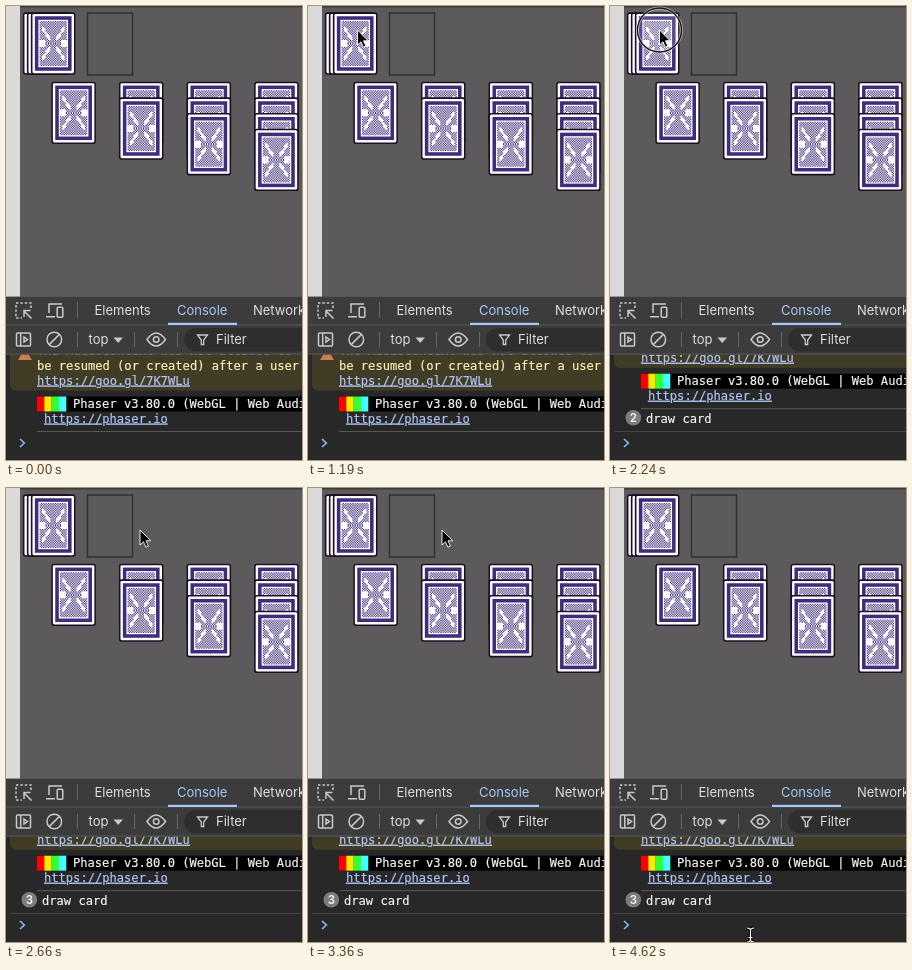
An HTML page that plays this animation: 296 px wide and 454 px high, repeating every 4.69 s.

```html
<!DOCTYPE html>
<html lang="en">
<head>
<meta charset="utf-8">
<title>Card table with console</title>
<style>
  html, body { margin: 0; width: 100%; height: 100%; overflow: hidden; background: #282828; }
  svg { display: block; width: 296px; height: 454px; }
  text { white-space: pre; }
  .ui { font: 13px Inter, "Liberation Sans", sans-serif; fill: #dedede; }
  .mono { font: 12.1px "DejaVu Sans Mono", "Liberation Mono", monospace; fill: #f4f4f4; stroke: #f4f4f4; stroke-width: .2; }
  .mono rect { stroke: none; }
  .mono .warn { fill: #fbf0b4; stroke: #fbf0b4; }
  .mono .link { fill: #b0c4f4; stroke: #b0c4f4; text-decoration: underline; }
  .icon { fill: none; stroke: #c9c9c9; stroke-width: 1.5; }
  .rule { fill: none; stroke: #56575a; }
</style>
</head>
<body>
<svg viewBox="0 0 296 454">
  <defs>
    <g id="card">
      <rect x="-.3" y="-.3" width="37.6" height="52.6" rx="2.2" fill="#1d0f26"/>
      <rect x="1" y="1" width="35" height="50" rx="1.2" fill="#fff"/>
      <rect x="3" y="3" width="31" height="46" fill="#3f2d7c"/>
      <rect x="6" y="6" width="25" height="40" fill="#fff"/>
      <path id="weave" fill="#3f2d7c"/>
    </g>
    <path id="beamShape" d="M-3.5 -7Q0 -7 0 -4.5Q0 -7 3.5 -7M0 -5V6M-3.5 7Q0 7 0 4.5Q0 7 3.5 7M-2 2.5H2"/>
    <clipPath id="consoleClip"><rect y="348" width="296" height="106"/></clipPath>
  </defs>

  <!-- game -->
  <rect width="296" height="291" fill="#5c5a5b"/>
  <rect x="14" width="282" height="1.5" fill="#3c3c3c"/>
  <rect x="81.5" y="7" width="45" height="62" fill="none" stroke="#303030" stroke-width="1.5"/>
  <g id="table"></g>

  <!-- console log -->
  <rect y="348" width="296" height="106" fill="#282828"/>
  <g clip-path="url(#consoleClip)">
    <g id="log">
      <rect x="4" y="330" width="300" height="54.5" rx="6" fill="#413c26"/>
      <path d="M12 354L19 342L26 354Z" fill="#c9804a"/>
      <g class="mono">
        <text class="warn" x="31" y="349">The AudioContext was not allowed to</text>
        <text class="warn" x="31" y="363.5">be resumed (or created) after a user</text>
        <text class="link" x="31" y="378.5">https://goo.gl/7K7WLu</text>
        <rect x="31" y="390.5" width="265" height="15" fill="#000"/>
        <g id="rainbow"></g>
        <text x="67" y="402.3">Phaser v3.80.0 (WebGL | Web Audio)</text>
        <text class="link" x="38" y="416.5">https://phaser.io</text>
      </g>
      <path class="rule" d="M31 425.5H296"/>
    </g>
    <g id="draw">
      <g id="badge">
        <circle cx="23.3" cy="411.7" r="7.8" fill="#7c7c7c"/>
        <text id="count" x="23.3" y="415.8" text-anchor="middle" style="font:600 11.5px Inter,sans-serif" fill="#f4f4f4"></text>
      </g>
      <text id="entry" class="mono" y="417">draw card</text>
      <path class="rule" d="M4 425.5H296" stroke-opacity=".6"/>
    </g>
    <path d="M14 433L18.3 437L14 441" fill="none" stroke="#8fb5fa" stroke-width="1.6"/>
  </g>

  <!-- toolbars -->
  <rect y="290" width="296" height="58.5" fill="#3c3c3c"/>
  <path d="M0 290.5H296M0 319H296M0 348H296" stroke="#555658"/>
  <rect width="14" height="290.5" fill="#dadada"/>
  <rect x="162" y="316.8" width="69" height="2.2" fill="#a8c7fa"/>
  <rect x="178" y="322" width="140" height="23.5" rx="11.7" fill="#2e2e2e"/>
  <path d="M71.5 296V312M71.5 326V341M128.5 326V341M171.5 326V341" stroke="#66676a"/>
  <g class="icon">
    <path d="M25 302V297H10V312H16" stroke-dasharray="2.4 2"/>
    <path d="M25.5 312.5L18 305M18 311V304.5H24.5"/>
    <path d="M43 307V298H56M40 310.8H49"/>
    <rect x="51.2" y="301.2" width="5.6" height="10" rx="1"/>
    <rect x="10.5" y="327" width="14" height="13" rx="1"/>
    <path d="M14.7 327V340M18 331L21.5 333.5L18 336Z"/>
    <circle cx="48.3" cy="333.5" r="7.3"/>
    <path d="M43.2 338.6L53.4 328.4"/>
    <path d="M141 333.5Q150 320.5 159.5 333.5Q150 346.5 141 333.5Z"/>
    <circle cx="150.2" cy="333.5" r="2.8"/>
    <path d="M191.5 329H201.5L197.7 334V338.5H195.3V334Z" stroke-width="1.3"/>
  </g>
  <path d="M107.5 331.5H117L112.2 337Z" fill="#c9c9c9"/>
  <g class="ui">
    <text x="88.5" y="308.5">Elements</text>
    <text x="171" y="308.5" style="fill:#a8c7fa">Console</text>
    <text x="247" y="308.5">Network</text>
    <text x="82.5" y="338">top</text>
    <text x="210" y="338">Filter</text>
  </g>

  <!-- pointer -->
  <g id="pointer">
    <g id="ring">
      <circle r="22" fill="#fff" fill-opacity=".14" stroke="#fff" stroke-opacity=".55" stroke-width="3"/>
      <circle r="22" fill="none" stroke="#151515" stroke-width="1.4"/>
    </g>
    <path id="arrow" d="M0 0V15L3.5 11.8L5.9 17.2L8.4 16.1L6 10.8H10.7Z" fill="#000" stroke="#fff" stroke-width=".9"/>
    <g id="beam" fill="none">
      <use href="#beamShape" stroke="#000" stroke-width="3"/>
      <use href="#beamShape" stroke="#fff" stroke-width="1.2"/>
    </g>
  </g>
</svg>
<script>
const $ = id => document.getElementById(id);
const make = (parent, tag, attrs) => {
  const el = document.createElementNS('http://www.w3.org/2000/svg', tag);
  for (const key in attrs) el.setAttribute(key, attrs[key]);
  parent.append(el);
};
const show = (el, on) => { el.style.display = on ? '' : 'none'; };

// Mirrored checker on the card back, with white petals along the diagonals
let weave = '';
for (let y = 7; y < 45; y++) {
  for (let x = 7; x < 30; x++) {
    const dx = Math.abs(x - 18), dy = Math.floor(Math.abs(y - 25.5));
    const petal = dx > 2 && dx < 10 && Math.abs(dy - 1.3 * dx) < 2;
    const side = Math.hypot(dx - 9, dy) < 2.6;
    const outline = Math.abs(dx - dy) === 6;
    const inked = !petal && !side && ((dx + dy) % 2 === 0 || outline && dx % 3 === 0);
    if (inked) weave += `M${x} ${y}h1v1h-1z`;
  }
}
$('weave').setAttribute('d', weave);

const addCard = (x, y) =>
  make($('table'), 'use', { href: '#card', transform: `translate(${x} ${y}) scale(1.185)` });
for (let i = 0; i < 3; i++) addCard(17.3 + i * 4, 6.7);
for (let col = 0; col < 4; col++) {
  for (let row = 0; row <= col; row++) addCard(45.7 + col * 67.6, 76 + row * 15.7);
}

['#f00', '#ffe800', '#3f3', '#4ff'].forEach((fill, i) =>
  make($('rainbow'), 'rect', { x: 31 + i * 7.3, y: 390.5, width: 7.4, height: 15, fill }));

const LOOP = 4690, STEP = 70;

// start, end, from, bend, to
const moves = [
  [0, 560, [296, 440], [150, 170], [49.5, 24]],
  [2380, 2660, [49.5, 24], [95, 24], [134, 42]],
  [3570, 3850, [134, 42], [136, 90], [133.5, 141]],
  [4130, 4620, [133.5, 141], [181, 300], [140.5, 447]]
];
const clicks = [
  [630, 700], [1120, 1190], [1750, 1820], [2240, 2310],
  [2730, 2870], [2940, 3080], [3150, 3290], [3430, 3500], [3850, 4130]
];
const logTimes = [1260, 1820, 2310];

const ease = p => p * p * (3 - 2 * p);

function place(t) {
  const [start, end, a, b, c] = moves.filter(m => t >= m[0]).pop();
  const p = ease(Math.min(1, (t - start) / (end - start))), q = 1 - p;
  return [0, 1].map(i => q * q * a[i] + 2 * q * p * b[i] + p * p * c[i]);
}

function draw(t) {
  const [x, y] = place(t);
  $('pointer').setAttribute('transform', `translate(${x} ${y})`);
  show($('pointer'), t >= 70);
  show($('ring'), clicks.some(([on, off]) => t >= on && t < off));
  show($('arrow'), y < 348);
  show($('beam'), y >= 348);

  const count = logTimes.filter(at => t >= at).length;
  $('log').setAttribute('transform', `translate(0 ${count ? -22.8 : 0})`);
  show($('draw'), count > 0);
  show($('badge'), count > 1);
  $('count').textContent = count;
  $('entry').setAttribute('x', count > 1 ? 36 : 31);
}

function tick() {
  draw(Math.floor(performance.now() % LOOP / STEP) * STEP);
  requestAnimationFrame(tick);
}
tick();
</script>
</body>
</html>
```
